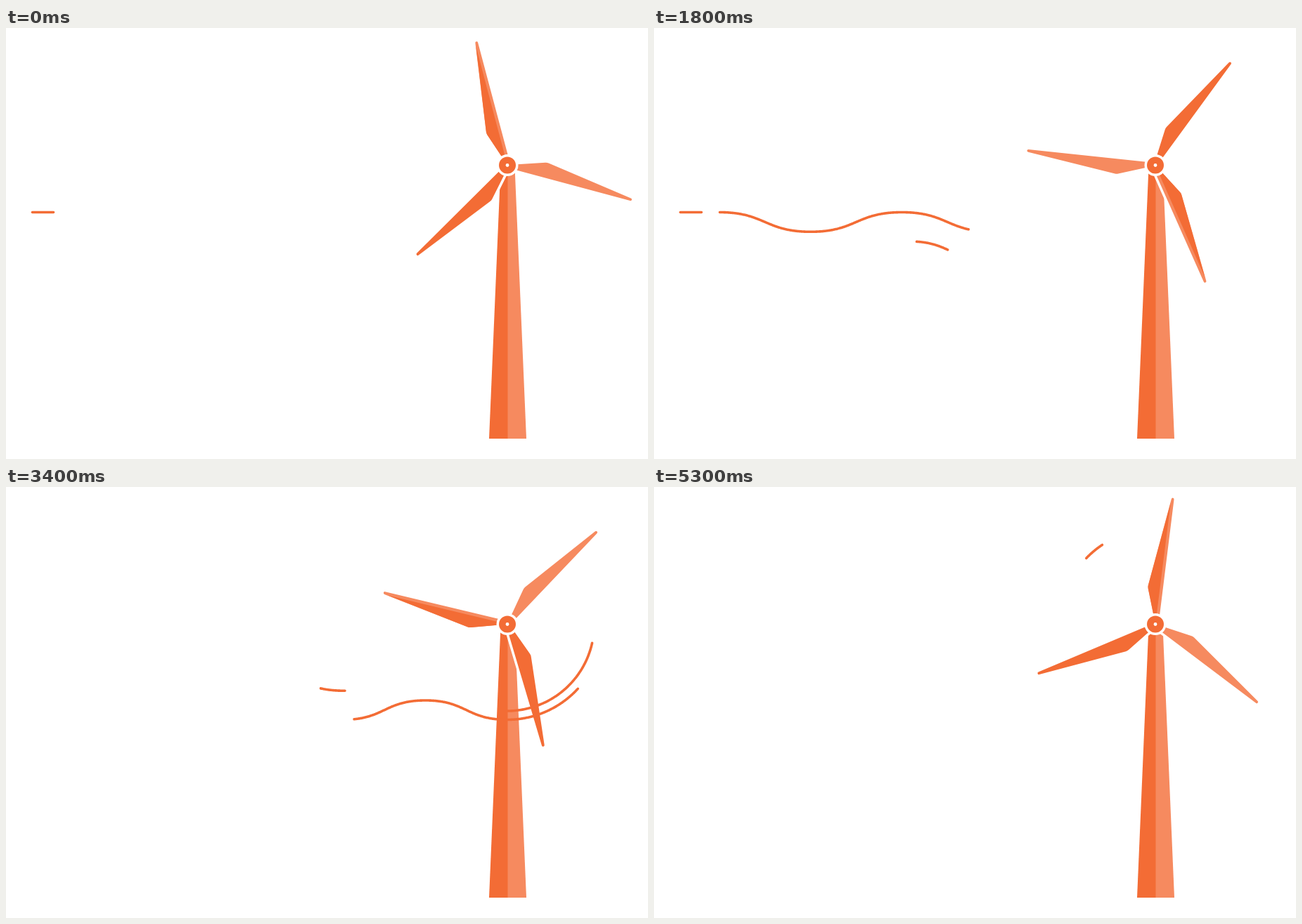
Write an HTML page with a canvas that moves like this. It is 913x614 px and loops after 5400 ms.

```html
<!DOCTYPE html>
<html lang="en">
<head>
<meta charset="utf-8">
<title>Wind turbine</title>
<style>
  html, body { margin: 0; width: 100%; height: 100%; overflow: hidden; background: #fff; }
  canvas { display: block; }
</style>
</head>
<body>
<canvas id="stage" width="913" height="614"></canvas>
<script>
const ctx = document.getElementById('stage').getContext('2d');
const LOOP = 5.4, STEP = 0.1, SPIN = 2.7;
const DARK = '#f36c35', LIGHT = '#f68a5f', WHITE = '#fff';
const HUB = { x: 713, y: 195.5 };
const RAD = Math.PI / 180;
const BLADE_LENGTH = 182.4;
const ROTOR_SHIFT = 1.35; // the rotor sits slightly off its pivot

// Steady speed from `start`, with constant acceleration after a further `delay` (seconds)
function travel(t, start, speed, gain = 0, delay = 0) {
  const run = Math.max(0, t - start);
  return speed * run + gain * Math.max(0, run - delay) ** 2;
}

// Height of a wave built from S-shaped curves, crest at startX
function waveY(x, startX, half, crest, trough) {
  const n = Math.floor((x - startX) / half);
  const f = (x - startX) / half - n;
  let u = f;
  for (let k = 0; k < 5; k++) {
    u -= (1.5 * u - 1.5 * u * u + u * u * u - f) / (1.5 - 3 * u + 3 * u * u);
  }
  const drop = u * u * (3 - 2 * u);
  return crest + (trough - crest) * (n % 2 ? 1 - drop : drop);
}

function orbit(radius, degrees) {
  const a = (90 - degrees) * RAD;
  return [HUB.x + radius * Math.cos(a), HUB.y + radius * Math.sin(a)];
}

const upperPoint = q => [q, q < 93 ? 262.5 : waveY(q, 93, 129.7, 262.5, 290.3)];
const lowerPoint = q => q < HUB.x
  ? [q, waveY(q, 363.2, 116.6, 304, 331.5)]
  : orbit(136, (q - HUB.x) / 136 / RAD);
const innerPoint = q => orbit(123.5, q);

function drawSpan(point, from, to) {
  if (to <= from) return;
  ctx.beginPath();
  ctx.moveTo(...point(from));
  for (let q = from + 1; q < to; q++) ctx.lineTo(...point(q));
  ctx.lineTo(...point(to));
  ctx.stroke();
}

function drawWind(t) {
  ctx.strokeStyle = DARK;
  ctx.lineWidth = 3.6;
  ctx.lineCap = ctx.lineJoin = 'round';

  const upperTail = 37.5 + travel(t, 2.06, 306);
  const upperHead = 67.5 + travel(t, 0, 211);
  drawSpan(upperPoint, upperTail, Math.min(67.5, upperHead));
  drawSpan(upperPoint, Math.max(93.5, upperTail), Math.min(482, upperHead));

  const lowerTail = 373.5 + travel(t, 2.77, 193, 249, 1.33);
  const lowerHead = 373.5 + travel(t, 1.38, 74, 74.2);
  drawSpan(lowerPoint, lowerTail, Math.min(1250, lowerHead));

  const innerTail = travel(t, 4.2, 130, 100);
  const innerHead = travel(t, 2.9, 130, 50);
  drawSpan(innerPoint, innerTail, Math.min(228.7, innerHead));
}

function fillPolygon(color, points) {
  ctx.fillStyle = color;
  ctx.beginPath();
  points.forEach(p => ctx.lineTo(...p));
  ctx.closePath();
  ctx.fill();
}

function fillCircle(color, r) {
  ctx.fillStyle = color;
  ctx.beginPath();
  ctx.arc(HUB.x, HUB.y, r, 0, 2 * Math.PI);
  ctx.fill();
}

function drawTower() {
  fillPolygon(DARK, [[703.2, 205], [714, 205], [714, 585], [687, 585]]);
  fillPolygon(LIGHT, [[713.5, 205], [723.8, 205], [740, 585], [713.5, 585]]);
}

// Broad edge shared by the whole blade and its shaded part
function broadEdge(tip) {
  ctx.beginPath();
  ctx.moveTo(12, -5);
  ctx.arcTo(52, -18.8, tip, -2, 10);
}

// Blade pointing along +x, broad edge on the -y side
function drawBlade(color, stripe) {
  const tip = BLADE_LENGTH - 2;
  broadEdge(tip);
  ctx.arc(tip, 0, 1.9, -Math.PI / 2, Math.PI / 2);
  ctx.lineTo(12, 3.2);
  ctx.closePath();
  ctx.strokeStyle = WHITE;
  ctx.lineWidth = 7;
  ctx.lineJoin = 'round';
  ctx.stroke();
  ctx.fillStyle = stripe || color;
  ctx.fill();
  if (!stripe) return;
  broadEdge(tip);
  ctx.lineTo(tip - 5, -2.2);
  ctx.lineTo(12, -1.2);
  ctx.closePath();
  ctx.fillStyle = color;
  ctx.fill();
}

function drawRotor(degrees) {
  ctx.save();
  ctx.translate(HUB.x, HUB.y);
  ctx.rotate(degrees * RAD);
  ctx.translate(ROTOR_SHIFT, 0);
  for (const [color, stripe] of [[LIGHT], [DARK], [DARK, LIGHT]]) {
    drawBlade(color, stripe);
    ctx.rotate(120 * RAD);
  }
  ctx.restore();
}

function draw(t) {
  ctx.fillStyle = WHITE;
  ctx.fillRect(0, 0, 913, 614);
  drawTower();
  drawRotor(15.55 - travel(t % SPIN, 0, 88, 37.8, 0.9));
  fillCircle(WHITE, 15.5);
  fillCircle(DARK, 12);
  fillCircle(WHITE, 2.4);
  drawWind(t);
}

const start = performance.now();
function tick() {
  const t = (performance.now() - start) / 1000 % LOOP;
  draw(Math.floor(t / STEP) * STEP);
  requestAnimationFrame(tick);
}
tick();
</script>
</body>
</html>
```
